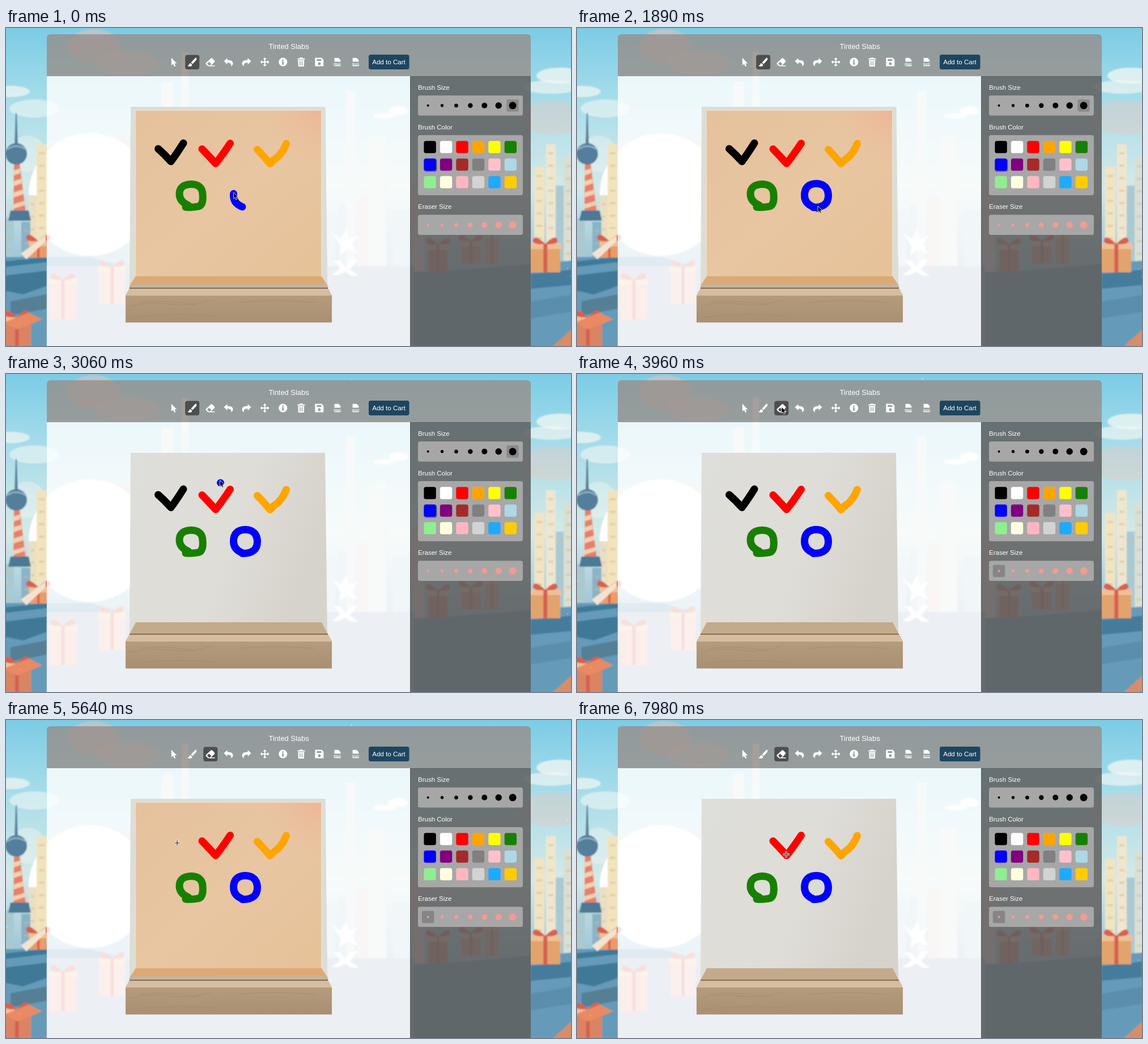
Write an HTML page that moves like this. It is 997 px wide and 561 px high and loops after 8 s.

```html
<!DOCTYPE html>
<html lang="en">
<head>
<meta charset="utf-8">
<title>Board editor</title>
<style>
html, body { margin: 0; width: 100%; height: 100%; overflow: hidden; background: #8ccfe4; }
svg { display: block; width: 100%; height: 100%; }
text { font-family: "Liberation Sans", Arial, sans-serif; fill: #fff; }
</style>
</head>
<body>
<svg viewBox="0 0 997 561" preserveAspectRatio="none">
  <defs>
    <linearGradient id="sky" x2="0" y2="1">
      <stop offset="0" stop-color="#7acbe5"/><stop offset=".22" stop-color="#a5dcea"/>
      <stop offset=".5" stop-color="#d5e9e6"/><stop offset=".72" stop-color="#9fc6d8"/>
      <stop offset="1" stop-color="#6f9fba"/>
    </linearGradient>
    <linearGradient id="peach" x2="1" y2="1">
      <stop offset="0" stop-color="#e5c19c"/><stop offset=".5" stop-color="#e8c6a2"/>
      <stop offset="1" stop-color="#e5c197"/>
    </linearGradient>
    <linearGradient id="glass" x2="1" y2=".3">
      <stop offset="0" stop-color="#dededa"/><stop offset=".6" stop-color="#dfddd7"/>
      <stop offset="1" stop-color="#d6d3cc"/>
    </linearGradient>
    <linearGradient id="wood" x2="0" y2="1">
      <stop offset="0" stop-color="#b49b7c"/><stop offset="1" stop-color="#a99073"/>
    </linearGradient>
    <radialGradient id="blush" cx="1" cy="0" r=".35">
      <stop offset="0" stop-color="#f0a88c" stop-opacity=".55"/><stop offset="1" stop-color="#f0b898" stop-opacity="0"/>
    </radialGradient>
    <filter id="soft" x="0" y="0" width="1" height="1"><feGaussianBlur stdDeviation="1.1"/></filter>
    <filter id="shade"><feDropShadow dx="1" dy="1" stdDeviation="1.2" flood-opacity=".7"/></filter>
  </defs>

  <g filter="url(#soft)">
    <rect x="-5" y="-5" width="1007" height="571" fill="url(#sky)"/>
    <g fill="#f4f8f4">
      <ellipse cx="8" cy="112" rx="34" ry="10" opacity=".7"/>
      <ellipse cx="50" cy="142" rx="44" ry="16" opacity=".55"/>
      <ellipse cx="692" cy="146" rx="17" ry="8"/><ellipse cx="668" cy="155" rx="20" ry="5"/>
      <ellipse cx="978" cy="84" rx="42" ry="14" opacity=".75"/>
      <ellipse cx="962" cy="104" rx="50" ry="12" opacity=".65"/>
      <circle cx="38" cy="222" r="32" opacity=".4"/>
    </g>
    <g fill="#f1c2b4">
      <ellipse cx="155" cy="32" rx="46" ry="30" opacity=".5"/><ellipse cx="215" cy="62" rx="55" ry="22" opacity=".4"/>
      <ellipse cx="160" cy="235" rx="100" ry="44" opacity=".55"/>
      <ellipse cx="965" cy="158" rx="60" ry="30" opacity=".35"/>
    </g>
    <circle cx="148" cy="294" r="108" fill="#fff"/>
    <g id="city"></g>
    <path d="M-5 404H150L240 430H760L1002 410V566H-5Z" fill="#659ab9"/>
    <path d="M72 420H720V566H72Z" fill="#a0b1c4"/>
    <path d="M-5 412L72 404V413L-5 422Z" fill="#3d7a99"/>
    <path d="M-5 437L72 428V455L30 470L-5 463Z" fill="#417997"/>
    <path d="M8 482L72 470V495L8 507Z" fill="#547f94"/>
    <path d="M926 434L1002 426V453L926 460Z" fill="#447c9c"/>
    <path d="M926 483L1002 470V500L926 512Z" fill="#5a8eaa"/>
    <path d="M960 566L1002 528V566Z" fill="#d78e67"/>
    <g id="tower">
      <path d="M17 150H19L21 210H15Z" fill="#56809d"/>
      <path d="M14 238H24L35 325H13Z" fill="#e6806b"/>
      <path d="M14 251L25 248V256L14 260ZM14 270L27 266 28 274 13 279ZM14 290L30 285 31 293 13 299ZM13 311L33 305 34 312 13 319Z" fill="#f1d2b4"/>
      <circle cx="18" cy="222" r="19" fill="#527e9c"/>
      <path d="M2 214Q18 203 35 214" stroke="#8bb2c4" stroke-width="3" fill="none"/>
      <path d="M8 322H40L44 340H4Z" fill="#4c7996"/>
    </g>
    <g id="gifts"></g>
    <g fill="#fff" opacity=".9">
      <path d="M575 360L590 372 600 355 606 373 622 365 610 382 621 398 602 391 588 401 591 386Z"/>
      <path d="M578 410H590L599 421 609 408H621L607 426 623 437H609L599 430 586 436H574L590 424Z"/>
    </g>
  </g>
  <g id="snow" fill="#fff"></g>

  <rect x="72" y="85" width="641" height="476" fill="#fff" opacity=".8"/>
  <path d="M72 85V18Q72 11 79 11H919Q926 11 926 18V85Z" fill="#968c87" opacity=".78"/>
  <rect x="713" y="85" width="213" height="476" fill="#5f5f5f" opacity=".86"/>
  <path d="M713.5 561V85.5H926" fill="none" stroke="#555b5c" opacity=".7"/>

  <path d="M220 139H563L567 458H218Z" fill="url(#glass)"/>
  <path d="M229 438H557L575 472V519H211V472Z" fill="#c3aa8b"/>
  <g id="lit">
    <path d="M220.500 139H563.500L567 452H218.500Z" fill="#dcded6"/>
    <path d="M229 145H556V438L566 452H219L229 438Z" fill="url(#peach)"/>
    <rect x="229" y="145" width="327" height="293" fill="url(#blush)"/>
    <path d="M228.500 438V145.500H556.500V438" fill="none" stroke="#f0dfca"/>
    <path d="M229 438H557L566 452H220Z" fill="#dca974"/>
    <path d="M220 451H566L569 458H217Z" fill="#c7b397"/>
  </g>
  <path d="M217 460H569L575 472H212Z" fill="#d5bea0"/>
  <path d="M218 459H568" stroke="#866c52" stroke-width="1.800"/>
  <path d="M211 474Q211 472 214 472H575V519.500H211Z" fill="url(#wood)"/>
  <path d="M218 491Q250 482 288 487T362 480M235 484Q285 478 338 489M410 484Q470 478 545 484M225 510Q300 502 370 508" fill="none" stroke="#9a8163" opacity=".5"/>

  <g fill="none" stroke-width="13" stroke-linecap="round" stroke-linejoin="round">
    <path id="black" d="M268.500 213Q280 223 291 235.500Q301 222 313 203" stroke="#000"/>
    <path d="M346 213.500Q358 226 370 239Q382 224 395.500 203.500" stroke="#f00"/>
    <path d="M443.500 214.500Q455 226 466 239.500Q470 234 479 228Q490 217 494.500 204" stroke="#ffa500"/>
    <path d="M322 313Q306 306 306 293Q306 276 327 275.500Q346 276 347 293Q349 314 338 315Q328 317 317 316" stroke="#178000"/>
    <path id="blue" d="M417 315.500C405 311 401.500 303 401.500 295C401.500 281 410 274.500 422 274.500C436 274.500 443.500 283 443.500 296C443.500 310 434 317 417 316.500" stroke="#00f"/>
  </g>

  <text x="499" y="37" font-size="12.9" text-anchor="middle">Tinted Slabs</text>
  <rect id="tool" y="47.500" width="25" height="25.500" rx="4" fill="#4d4e4e"/>
  <g id="icons" fill="#fff"></g>
  <rect x="640" y="47" width="71.500" height="26" rx="3.500" fill="#1e4560"/>
  <text x="675.500" y="64" font-size="11.6" text-anchor="middle">Add to Cart</text>
  <g id="side"></g>

  <circle id="tip" r="6.500" fill="#00f"/>
  <path id="arrow" d="M0 0V11L2.500 8.800 4.300 12.800 6.300 11.900 4.600 8H8Z" fill="#000" stroke="#fff" stroke-width=".8"/>
  <g id="cross" fill="none">
    <path d="M-5.500 0H5.500M0-5.500V5.500" stroke="#fff" stroke-width="3"/>
    <path d="M-4.800 0H4.800M0-4.800V4.800" stroke="#111" stroke-width="1.100"/>
  </g>
</svg>
<script>
const $ = id => document.getElementById(id);
const LOOP = 8000;

function add(parent, tag, attrs) {
  const el = document.createElementNS("http://www.w3.org/2000/svg", tag);
  for (const k in attrs) el.setAttribute(k, attrs[k]);
  return parent.appendChild(el);
}
const box = (parent, x, y, width, height, fill, rx = 0) =>
  add(parent, "rect", { x, y, width, height, fill, rx });
const show = (el, on) => { el.style.display = on ? "" : "none"; };
const move = (el, x, y) => el.setAttribute("transform", `translate(${x} ${y})`);

let seed = 11;
const rnd = () => (seed = (seed * 16807) % 2147483647) / 2147483647;

// Skyline
for (let x = 235; x < 720; x += 32)
  box($("city"), x, 270 + rnd() * 90, 18 + rnd() * 14, 180, ["#c9d6df", "#e6d2cb", "#b7d0df"][x % 3]);
[[275, 95, 20, 330], [310, 42, 12, 350], [600, 110, 16, 320], [640, 190, 30, 250]]
  .forEach(b => box($("city"), ...b, "#d9e3e4"));
[[40, 295, 14, "#eadfc3"], [54, 205, 18, "#f1e3bd"], [-4, 335, 18, "#a7cbd2"], [27, 342, 16, "#89b3c6"],
 [932, 245, 18, "#f0e4c2"], [953, 205, 17, "#eee6cf"], [970, 278, 15, "#a8cad5"], [984, 228, 18, "#d9dfd2"]]
  .forEach(([x, y, w, fill]) => {
    box($("city"), x, y, w, 420 - y, fill);
    for (let j = y + 14; j < 400; j += 22) box($("city"), x + 4, j, w - 8, 4, "#cfb891").setAttribute("opacity", .45);
  });

// Gift boxes
[[925, 385, 53, 46, "#e3a36c"], [745, 386, 34, 44, "#d97a62"], [802, 380, 36, 36, "#dd8c70"], [845, 366, 24, 50, "#d99478"],
 [42, 380, 30, 25, "#ed9a66"], [-6, 514, 50, 48, "#da8464"], [76, 448, 48, 66, "#edab9b"], [165, 425, 44, 62, "#ebb2a4"]]
  .forEach(([x, y, w, h, fill]) => {
    const g = $("gifts");
    box(g, x, y, w, h, fill);
    box(g, x - 2, y - 5, w + 4, 10, "#efc096");
    box(g, x + w * .44, y - 4, w * .13, h + 4, "#d5614f");
    const cx = x + w / 2;
    add(g, "path", { d: `M${cx} ${y - 4}q-20-20-22-5q2 7 22 5q20-20 22-5q-2 7-22 5`, fill: "#d8604f" });
  });
add($("gifts"), "path", { d: "M26 398L70 366V376L36 408Z", fill: "#f3e4d2" });
add($("gifts"), "path", { d: "M-5 520L40 502 64 514 20 532Z", fill: "#e98a64" });

const flakes = Array.from({ length: 34 }, () => ({
  x: rnd() < .55 ? 72 + rnd() * 875 : rnd() * 997, y: 2 + rnd() * 540, phase: rnd(),
  el: add($("snow"), "circle", { r: .7 + rnd() * .8 })
}));

// Toolbar icons, each drawn around its own centre
const page = "M-6-8H2L6-4V0H-6ZM-6 8V6H6V8Z";
const icons = [
  "M-4.500-7.500V6L-1.500 3.300.800 8 3 7 .900 2.500H5Z",
  "M7-7.500Q9-6 7-3L1 3.500-2 1 5-6.500Q6-8 7-7.500ZM-3 2L0 4.500Q0 8-4 8-7 8-8 6-5 6-5 3.500-4 2-3 2Z",
  "M-8 2L1-6.500Q2-7.500 3.500-6.500L7.500-2.500Q8.500-1 7.500 0L1.500 6H8V7.500H-3.500L-8 3.500ZM-5.500 2.700L-2.500 6H-.500L2 3.500-2-.500Z",
  "M-8-1.500L-2-7V-3.500Q8-4 8 2.500 8 5.500 4.500 7.500 6.500 1-2 1V4.500Z",
  "M8-1.500L2-7V-3.500Q-8-4-8 2.500-8 5.500-4.500 7.500-6.500 1 2 1V4.500Z",
  "M0-8L3.200-4.700H1V-1H4.700V-3.200L8 0 4.700 3.200V1H1V4.700H3.200L0 8-3.200 4.700H-1V1H-4.700V3.200L-8 0-4.700-3.200V-1H-1V-4.700H-3.200Z",
  "M0-7.500A7.500 7.500 0 1 0 .1-7.500ZM-1.200-4.500H1.200V-2.300H-1.200ZM-2-1.200H1.200V3H2V4.600H-2V3H-1.200V.4H-2Z",
  "M-6.500-6.500H-3L-2-8H2L3-6.500H6.500V-4.500H-6.500ZM-5.500-3.500H5.500L5 8H-5ZM-3-1.500V6H-2V-1.500ZM-.500-1.500V6H.500V-1.500ZM2-1.500V6H3V-1.500Z",
  "M-7-7.500H4L7.500-4V7.500H-7.500V-7ZM-4.500-5V-2H3.500V-5ZM0 .5A2.500 2.500 0 1 0 .1.5Z",
  page, page
];
icons.forEach((d, i) => {
  const x = 296.3 + 32.07 * i, small = i > 8;
  add($("icons"), "path", {
    d, "fill-rule": "evenodd", transform: `translate(${x} 60)` + (small ? " scale(.9)" : "")
  });
  if (!small) return;
  box($("icons"), x - 7.5, 59.5, 15, 6.5, "#929d9e");
  add($("icons"), "text", {
    x, y: 65.5, "font-size": 6.2, "font-weight": 700, "text-anchor": "middle"
  }).textContent = i === 9 ? "PNG" : "SVG";
});

// Side panel
const side = $("side");
function section(label, y, h) {
  add(side, "text", { x: 727, y: y - 10.5, "font-size": 11.5 }).textContent = label;
  box(side, 727, y, 185, h, "#a7a7a7", 3.5);
}
const sizes = [2, 2.7, 3.4, 4.2, 5, 5.7, 6.5];
const dots = (y, fill) => sizes.forEach((r, i) =>
  add(side, "circle", { cx: 744.6 + 24.92 * i, cy: y, r, fill }));

section("Brush Size", 119, 35.5);
const brushMark = box(side, 883.3, 126, 21.5, 21.5, "#898989", 3);
dots(136.8, "#000");
section("Brush Color", 189, 106);
section("Eraser Size", 329.5, 35.5);
const eraserMark = box(side, 733.8, 336.7, 21.5, 21.5, "#858585", 3);
dots(347.5, "#f19c94");
const swatches = ("#000 #fff red orange yellow #178000 #00f purple brown gray pink lightblue " +
  "lightgreen lightyellow lightpink lightgray #1eaaff #fc0").split(" ").map((fill, i) =>
  box(side, 737.4 + 28.45 * (i % 6), 199.3 + 31 * Math.floor(i / 6), 21.4, 21.4, fill, 3.5));

// Pointer: [time, x, y]; the blue ring sets the pose before the first key
const keys = [
  [1450, 425, 314], [2000, 425, 314], [2700, 377.5, 187.5], [3250, 377.5, 187.5],
  [3700, 361, 58], [4020, 361, 58], [4620, 308, 214], [4950, 308, 214],
  [5250, 302, 217], [6100, 302, 217], [6600, 348, 223.5], [7250, 348, 223.5],
  [7750, 369, 237], [8000, 369, 237]
];
const ring = $("blue"), ringLen = ring.getTotalLength();

function pointer(t, drawn) {
  if (t < 1450) {
    const p = ring.getPointAtLength(drawn), near = Math.max(0, (t - 1150) / 300);
    return [p.x + near * 8, p.y - 2.5];
  }
  const i = keys.findIndex(k => k[0] > t);
  const [t0, x0, y0] = keys[i - 1], [t1, x1, y1] = keys[i];
  const p = (t - t0) / (t1 - t0), e = p * p * (3 - 2 * p);
  return [x0 + (x1 - x0) * e, y0 + (y1 - y0) * e];
}

function render(t) {
  const erasing = t >= 3840;
  const drawn = ringLen * Math.min(1, .225 + .775 * t / 1450);
  const [x, y] = pointer(t, drawn);
  const crossed = (t >= 4560 && t < 6150) || t >= 7480;

  // The lamp is on for 2 s, then off for 3 s
  show($("lit"), (t + 50) % 5000 < 2000);
  show($("black"), t < 5280);
  ring.setAttribute("stroke-dasharray", `${drawn} ${ringLen * 2}`);

  $("tool").setAttribute("x", erasing ? 348.3 : 316.2);
  show(brushMark, !erasing);
  show(eraserMark, erasing);
  swatches[6].setAttribute("filter", erasing ? "none" : "url(#shade)");

  show($("tip"), t >= 1450 && !erasing && y > 85);
  show($("arrow"), !crossed);
  show($("cross"), crossed);
  move($("tip"), x + 1, y + 4.5);
  move($("arrow"), x, y);
  move($("cross"), x, y);

  for (const f of flakes) {
    const p = (t / 1620 + f.phase) % 1;
    move(f.el, f.x, f.y + p * 7);
    f.el.setAttribute("opacity", .5 * Math.sin(Math.PI * p));
  }
}

const start = performance.now();
function tick() {
  render((performance.now() - start) % LOOP);
  requestAnimationFrame(tick);
}
tick();
</script>
</body>
</html>
```
